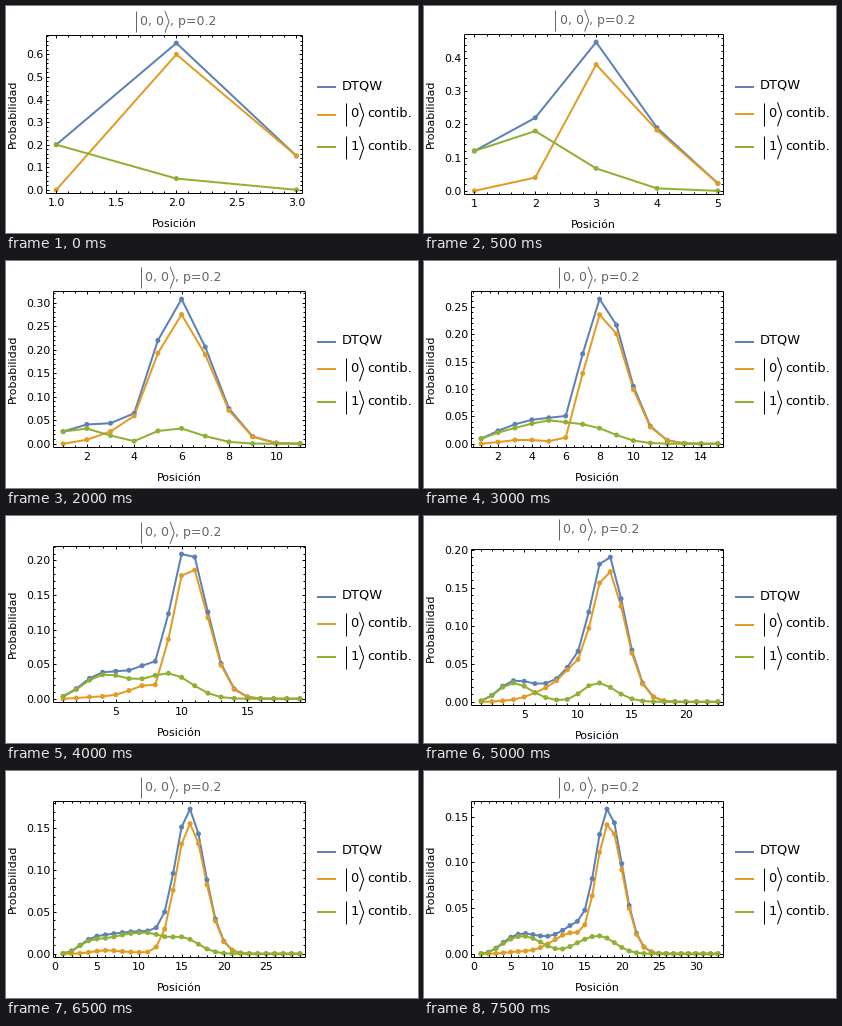
A matplotlib script that plays this animation: 412x227 px, repeating every 8000 ms.

```python
import math

import matplotlib.pyplot as plt
import numpy as np
from matplotlib.animation import FuncAnimation
from matplotlib.collections import LineCollection, PatchCollection
from matplotlib.patches import Circle

W, H, DPI = 412, 227, 100
STEPS = 16
P = 0.2                     # probability of the extra right shift
COIN = math.radians(30)
BLUE, ORANGE, GREEN = "#5e81b5", "#e19c24", "#8fb032"
GRAY = "#666666"
ASPECT = 252 / 156
DIGIT = 0.636               # digit width in em
PAD_L, PAD_R, PAD_B, PAD_T = 0.039, 0.021, 0.0225, 0.05
MAJOR, MINOR = 3, 2         # tick lengths

plt.rcParams["font.family"] = "DejaVu Sans"
fig = plt.figure(figsize=(W / DPI, H / DPI), dpi=DPI, facecolor="white")
ax = fig.add_axes([0, 0, 1, 1])


def pt(px):
    return px * 72 / DPI


def text(x, y, s, size, color="black", ha="left", **kw):
    return ax.text(x, y, s, fontsize=pt(size), color=color, ha=ha,
                   va=kw.pop("va", "baseline"), **kw)


def line(xs, ys, color, width, **kw):
    ax.plot(xs, ys, color=color, lw=pt(width), **kw)


def text_width(s, size):
    return sum(DIGIT if c.isdigit() else DIGIT / 2 for c in s) * size


def ket(x, y, label, size, color, up, down):
    """Draw |label> with its bar at x and baseline y; return the right end."""
    line([x, x], [y - up, y + down], color, 1, solid_capstyle="butt")
    text(x + 4.2, y, label, size, color)
    b = x + 5.4 + text_width(label, size)
    mid = y + (down - up) / 2
    line([b, b + 4, b], [y - up, mid, y + down], color, 1,
         solid_joinstyle="miter")
    return b + 4.6


def walk(t):
    """Probabilities of both coin states at 2t+1 sites after t steps."""
    c, s = math.cos(COIN), math.sin(COIN)
    a = np.zeros(t + 1)
    b = np.zeros(t + 1)
    a[t] = 1
    for _ in range(t):
        a, b = c * a + s * b, np.roll(s * a - c * b, -1)
    shift = [math.comb(t, k) * P**k * (1 - P)**(t - k) for k in range(t + 1)]
    return np.convolve(a**2, shift), np.convolve(b**2, shift)


def multiples(step, lo, hi):
    return np.arange(math.ceil(lo / step), math.floor(hi / step) + 1)


def x_step(n):
    if n < 5:
        return 0.5, 5
    if n < 9:
        return 1, 5
    return (2, 4) if n < 16 else (5, 5)


def legend(dy):
    rows = [(80.7, 82.8, BLUE, None), (108.4, 110.8, ORANGE, "0"),
            (140.8, 143.9, GREEN, "1")]
    for y, base, color, state in rows:
        line([311, 330], [y + dy, y + dy], color, 2, solid_capstyle="butt")
        if state is None:
            text(336, base + dy, "DTQW", 13)
        else:
            ket(340, base + dy, state, 13, "black", 14, 9)
            text(361, base + dy, "contib.", 13)


def draw(i):
    ax.clear()
    ax.set(xlim=(0, W), ylim=(H, 0))
    ax.axis("off")

    t = i + 1
    n = 2 * t + 1
    zero, one = walk(t)
    total = zero + one
    peak = total.max()

    # data ranges and tick spacing
    dx = (n - 1) / (1 - PAD_L - PAD_R)
    x0, x1 = 1 - PAD_L * dx, 1 + (1 - PAD_L) * dx
    dy = peak / (1 - PAD_B - PAD_T)
    y0, y1 = -PAD_B * dy, (1 - PAD_B) * dy
    xs, x_sub = x_step(n)
    ys = 0.1 if y1 > 0.4 else 0.05
    x_fmt = "{:.1f}" if xs < 1 else "{:.0f}"
    y_fmt = "{:.1f}" if ys == 0.1 else "{:.2f}"

    # frame box, giving way to labels that stick out
    left = 40.3 if ys == 0.1 else 47.3
    last = multiples(xs, x0, x1)[-1] * xs
    edge = (x1 - last) / dx * 252
    right = 299.3 - max(0, text_width(x_fmt.format(last), 11) / 2 - edge)
    height = (right - left) / ASPECT
    top_tick = multiples(ys, y0, y1)[-1] * ys
    over = max(0, 6.3 - (y1 - top_tick) / dy * height)
    top = 108.3 - height / 2 + over / 2
    bottom = top + height
    mid = (left + right) / 2

    def px(x):
        return left + (x - x0) / dx * (right - left)

    def py(y):
        return bottom - (y - y0) / dy * height

    # curves
    sites = px(np.arange(1, n + 1))
    curves = [(total, BLUE), (zero, ORANGE), (one, GREEN)]
    for values, color in curves:
        line(sites, py(values), color, 2, solid_joinstyle="round")
    for values, color in curves:
        dots = [Circle(p, 2.5) for p in zip(sites, py(values))]
        ax.add_collection(PatchCollection(dots, color=color, lw=0, zorder=2.5))

    # frame and ticks
    segs = [[(left, top), (right, top)], [(left, bottom), (right, bottom)],
            [(left, top), (left, bottom)], [(right, top), (right, bottom)]]
    for k in multiples(xs / x_sub, x0, x1):
        x, size = px(k * xs / x_sub), MINOR if k % x_sub else MAJOR
        segs += [[(x, bottom), (x, bottom - size)], [(x, top), (x, top + size)]]
    for k in multiples(ys / 5, y0, y1):
        y, size = py(k * ys / 5), MINOR if k % 5 else MAJOR
        segs += [[(left, y), (left + size, y)], [(right, y), (right - size, y)]]
    ax.add_collection(LineCollection(segs, colors="black", lw=pt(1), zorder=3))

    # labels
    for k in multiples(xs, x0, x1):
        text(px(k * xs), bottom + 13, x_fmt.format(k * xs), 11, ha="center")
    for k in multiples(ys, y0, y1):
        text(left - 2.5, py(k * ys) + 4, y_fmt.format(k * ys), 11, ha="right")
    text(mid, bottom + 33.2, "Posición", 11, ha="center")
    text(6.5, (top + bottom) / 2, "Probabilidad", 11, ha="center",
         va="center", rotation=90)

    base = top - over - 10
    end = ket(mid - 38.3, base, "0, 0", 12.5, GRAY, 14, 7)
    text(end, base, ", p=0.2", 12.5, GRAY)
    legend(0.5 if i == 0 or over > 0 else 0)
    return []


anim = FuncAnimation(fig, draw, frames=STEPS, interval=500, repeat=True,
                     repeat_delay=0, init_func=lambda: [], blit=False)
plt.show()
```
